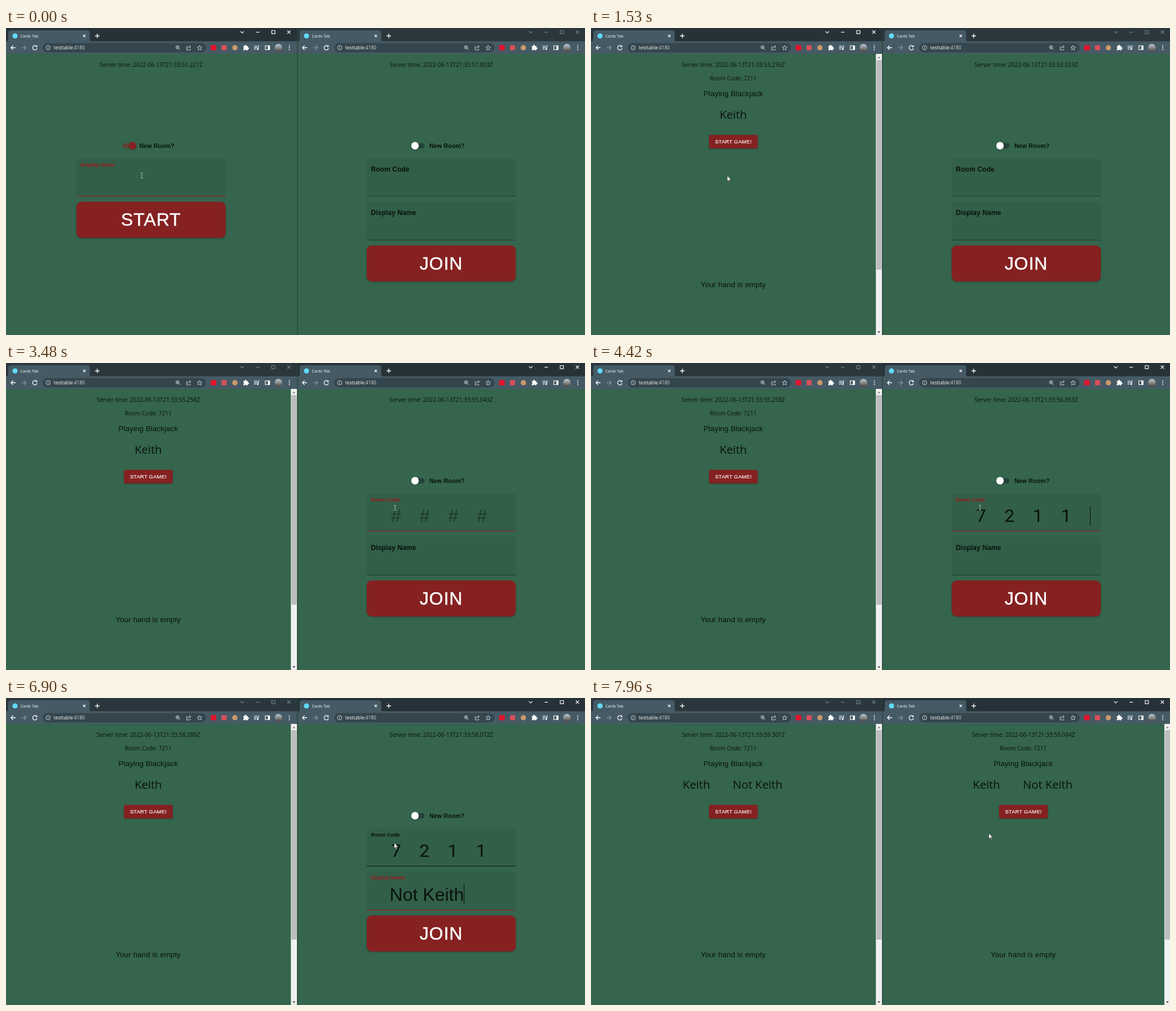
Animation of 1027x545 px, one loop 8000 ms. Source, as an HTML page:

```html
<!DOCTYPE html>
<html lang="en">
<head>
<meta charset="utf-8">
<title>Card room</title>
<style>
html, body { margin: 0; width: 100%; height: 100%; overflow: hidden; background: #35654d; }
svg { display: block; width: 1027px; height: 545px; }
text { white-space: pre; }
.ui { font-family: "Open Sans", "Noto Sans", sans-serif; }
.ar { font-family: "Liberation Sans", Arial, sans-serif; }
.num { font-family: Roboto, "Liberation Sans", sans-serif; }
.raised { filter: drop-shadow(0 1px 1px rgba(0, 0, 0, .3)); }
</style>
</head>
<body>
<svg id="stage" viewBox="0 0 1027 545"></svg>
<script>
const LOOP = 8000;
const RED = '#852121', HOT = '#a01a1e', INK = '#09120d', GREEN = '#35654d';
const NAME = 'Keith', GUEST = 'Not Keith', CODE = '7211';
const ROOM_L = 1410, FOCUS = 2670, TAB = 4450, ARROW = 6900, JOINED = 6960;

const ticksL = [[0, '51.221'], [510, '52.231'], [1530, '53.236'], [2450, '54.246'], [3480, '55.258'],
  [4480, '56.270'], [5450, '57.280'], [6480, '58.289'], [7420, '59.301']];
const ticksR = [[0, '51.003'], [360, '52.013'], [1320, '53.023'], [2240, '54.028'], [3240, '55.043'],
  [4210, '56.053'], [5210, '57.063'], [6240, '58.072'], [7210, '59.084']];
const keysName = [90, 270, 360, 480, 570];
const keysCode = [3870, 4150, 4240, 4330];
const keysGuest = [5790, 5940, 6000, 6090, 6240, 6330, 6450, 6540, 6690];
const caretOff = [[0, 90], [1100, FOCUS], [3210, 3690], [5000, 5450]];
const mouse = [[0, 241, 262], [2240, 241, 262], [2330, 330, 258], [2450, 560, 254], [2540, 690, 257],
  [ARROW, 688, 257], [JOINED, 693, 249], [7420, 693, 249], [7540, 689, 249],
  [7720, 684, 254], [7780, 680, 257], [7840, 687, 251], [7900, 697, 244], [7960, 705, 240]];

const last = (steps, t) => steps.filter(s => s[0] <= t).pop();
const typed = (word, keys, t) => word.slice(0, keys.filter(k => k <= t).length);
const ease = (t, from, ms = 200) => {
  const k = Math.min(1, Math.max(0, (t - from) / ms));
  return 1 - (1 - k) ** 3;
};
const pen = document.createElement('canvas').getContext('2d');
const widthOf = s => {
  pen.font = '32px "Liberation Sans", Arial, sans-serif';
  return pen.measureText(s).width;
};

const rect = (x, y, w, h, fill, r = 0, more = '') =>
  `<rect x="${x}" y="${y}" width="${w}" height="${h}" rx="${r}" fill="${fill}" ${more}/>`;
const disc = (x, y, r, fill, more = '') => `<circle cx="${x}" cy="${y}" r="${r}" fill="${fill}" ${more}/>`;
const ring = (x, y, r, c, w = 1) =>
  `<circle cx="${x}" cy="${y}" r="${r}" fill="none" stroke="${c}" stroke-width="${w}"/>`;
const line = (d, c, w = 1) => `<path d="${d}" fill="none" stroke="${c}" stroke-width="${w}"/>`;
const fill = (d, c) => `<path d="${d}" fill="${c}"/>`;
const text = (cls, s, x, y, size, c, more = '') =>
  `<text class="${cls}" x="${x}" y="${y}" font-size="${size}" fill="${c}" ${more}>${s}</text>`;
const MID = 'text-anchor="middle"';
const RAISED = 'class="raised"';
const bold = 'font-weight="700"';
const at = (x, y, s) => `<g transform="translate(${x} ${y})">${s}</g>`;

// Browser frame: b shifts the left-hand parts, r the right-hand parts.
function chrome(b, r, x, w, active) {
  const white = '#fafbfb', pale = '#d5dde0', grey = '#8e9ca3';
  const win = active ? white : '#74828a';
  const cross = 'M-2.8-2.8L2.8 2.8M2.8-2.8L-2.8 2.8';
  const small = 'M-2-2L2 2M2-2L-2 2';
  return rect(x, 0, w, 24, active ? '#263238' : '#2b373d') + rect(x, 23.5, w, 22.5, '#455a64')
    + at(b, 0,
      fill('M1 24Q4 24 4 20V8.500Q4 4 8.500 4H144Q148.500 4 148.500 8.500V20Q148.500 24 151.500 24Z', '#455a64')
      + disc(16, 14, 4.6, '#61dafb')
      + text('ui', 'Cards Tab', 25.5, 16.7, 7, white)
      + at(138.8, 14, line(small, white, 1.1))
      + line('M158 14H165.800M161.900 10.100V17.900', white, 1.3)
      + line('M17 35H8.800M12.600 31.200L8.800 35L12.600 38.800', white, 1.3)
      + line('M27.500 35H35.700M31.900 31.200L35.700 35L31.900 38.800', grey, 1.2)
      + line('M54 32.300A3.900 3.900 0 1 0 55 36', white, 1.3) + fill('M55.400 30.500V34.100H51.800Z', white))
    + rect(65 + b, 26.8, 290 + r - b, 16.4, '#34454d', 8.2)
    + at(b, 0, ring(74.8, 35, 3.9, pale, .9) + line('M74.800 34.500V37.200M74.800 32.600V33.500', pale)
      + text('ui', 'testtable<tspan fill="#d0d9dc">:4180</tspan>', 84.8, 37.9, 8.3, white))
    + at(r, 0,
      ring(304.3, 34.2, 2.8, pale) + line('M306.300 36.300L309 39M302.900 34.200H305.700M304.300 32.800V35.600', pale, .9)
      + line('M322 33H320.500V39H327V37M322.500 36.500Q323 33 327 33M325.300 30.800L327.800 33L325.300 35.200', pale, .9)
      + line('M343.500 30.900L344.700 33.700L347.700 34L345.400 36L346.100 39L343.500 37.400L340.900 39L341.600 36L339.300 34L342.300 33.700Z', pale, .9)
      + rect(363, 30.2, 10, 9.6, '#e0142c', 2)
      + rect(382.3, 30.6, 9, 9, '#d8505a', 1)
      + disc(406, 35, 4.7, '#c99a6b')
      + fill('M421 32H423.500A1.600 1.600 0 1 1 426.500 32H429V34.500A1.600 1.600 0 1 1 429 37.500V39.500H426.300A1.400 1.400 0 0 0 423.600 39.500H421V37A1.400 1.400 0 0 0 421 34.300Z', white)
      + line('M440 32H446M440 34.700H446M440 37.400H443.500M447.500 37.500V32H449.500', white, 1.2) + disc(446.4, 37.6, 1.5, white)
      + line('M460 31.500H467.600V38.500H460Z', white, 1.2) + rect(464.5, 31.5, 3, 7, white)
      + disc(483.2, 35, 6.7, 'url(#photo)')
      + disc(502.5, 31.5, 1, white) + disc(502.5, 35, 1, white) + disc(502.5, 38.5, 1, white))
    + at(r, 0,
      line('M415.800 5.800L419 9L422.200 5.800', win, 1.2) + line('M443.500 7.500H449.500', win, 1.2)
      + line('M471.300 4.500H477V10.200H471.300Z', win, 1.2) + at(501.8, 7.3, line(cross, win, 1.2)));
}

const stamp = (cx, ticks, t) =>
  text('ui', `Server time: 2022-06-13T21:33:${last(ticks, t)[1]}Z`, cx, 68.6, 10.1, INK, MID);

function button(x, y, w, h, r, label, size, base) {
  return rect(x, y, w, h, RED, r, RAISED)
    + text('ar', label, x + w / 2, base, size, '#fff',
      `${MID} letter-spacing="${size * .02857}" stroke="#fff" stroke-width="${size * .016}"`);
}

function toggle(x, on) {
  return rect(x + .3, 204.4, 22.7, 9.3, on ? '#5d4337' : '#24413a', 4.65)
    + disc(x + (on ? 18 : 6), 209, 6.67, on ? RED : '#fff', RAISED)
    + text('ar', 'New Room?', x + (on ? 30 : 31.5), 212.6, 10.67, INK, `${bold} letter-spacing=".1"`);
}

// k: label shrink 0..1, f: focus line 0..1
function field(x, y, h, label, k, f, hover) {
  const size = 12 - 3 * k, b = y + h;
  return fill(`M${x} ${b}V${y + 3}Q${x} ${y} ${x + 3} ${y}H${x + 261.500}Q${x + 264.500} ${y} ${x + 264.500} ${y + 3}V${b}Z`, '#325f48')
    + rect(x, b - 1, 264.5, 1, hover ? '#0d1a13' : '#1f3d2e')
    + (f > 0 ? rect(x + 132.25 * (1 - f), b - 1, 264.5 * f, 1, HOT) : '')
    + text('ar', label, x + 7.6, y + 23.4 - 9.3 * k, size, f > 0 ? HOT : INK, `${bold} letter-spacing="${size * .0094}"`);
}

const caret = (x, y, t) =>
  caretOff.some(([a, b]) => t >= a && t < b) ? '' : rect(Math.floor(x), y, 1, 36, INK);

function room(cx, t, ticks) {
  const both = t >= JOINED;
  const h6 = `${MID} letter-spacing=".1"`;
  return stamp(cx, ticks, t)
    + text('ui', 'Room Code: ' + CODE, cx, 92.6, 10.1, INK, MID)
    + text('ar', 'Playing Blackjack', cx, 121, 13.33, INK, h6)
    + (both
      ? text('ui', NAME, cx - 89.5, 160.6, 20.2, INK) + text('ui', GUEST, cx - .8, 160.6, 20.2, INK)
      : text('ui', NAME, cx, 160.6, 20.2, INK, MID))
    + button(cx - 43, 189.7, 86.3, 24, 2.7, 'START GAME!', 9.33, 204.6)
    + text('ar', 'Your hand is empty', cx, 460, 13.33, INK, h6);
}

const scrollbar = x => rect(x, 46, 11, 499, '#f1f1f1') + rect(x + 1, 57, 9.3, 372, '#bdbdbd')
  + fill(`M${x + 3} 53.500L${x + 5.500} 50.500L${x + 8} 53.500Z`, '#808080')
  + fill(`M${x + 3} 538.500L${x + 5.500} 541.500L${x + 8} 538.500Z`, '#404040');

function left(t) {
  if (t >= ROOM_L) return room(252.3, t, ticksL) + scrollbar(505.3);
  const word = typed(NAME, keysName, t);
  return stamp(257.5, ticksL, t) + toggle(206.5, true)
    + field(125, 232, 67, 'Display Name', 1, 1)
    + text('ar', word, 166.5, 282.3, 32, INK) + caret(166.5 + widthOf(word) + .3, 253, t)
    + button(125, 308.6, 264.6, 64, 9, 'START', 32, 351.4);
}

function right(t) {
  if (t >= JOINED) return room(766.8, t, ticksR) + scrollbar(1017);
  const code = typed(CODE, keysCode, t), word = typed(GUEST, keysGuest, t);
  const k1 = ease(t, FOCUS), k2 = ease(t, TAB);
  let s = stamp(772, ticksR, t) + toggle(719.5, false)
    + field(639.7, 232, 67, 'Room Code', k1, t < TAB ? k1 : 0, t >= 2500)
    + field(639.7, 308.3, 68.7, 'Display Name', k2, k2, false)
    + button(639.7, 386, 264.5, 64, 9, 'JOIN', 32, 429);
  s += code ? text('num', code, 683.1, 282.3, 32, INK, 'letter-spacing="32.2"')
    : text('ar', '####', 683.1, 282.3, 32, '#0b1a12', `letter-spacing="32.9" opacity="${.55 * k1}"`);
  if (t >= FOCUS && t < TAB) s += caret(683.1 + 50.7 * code.length, 253, t);
  s += text('ar', word, 680.6, 359.5, 32, INK);
  if (t >= TAB) s += caret(680.6 + widthOf(word) + .4, 330, t);
  return s;
}

function pointer(t) {
  const i = mouse.filter(m => m[0] <= t).length - 1;
  const a = mouse[i], b = mouse[i + 1];
  let [, x, y] = a;
  const gliding = b && (b[0] <= 2540 || a[0] >= 7420);
  if (gliding) {
    const k = (t - a[0]) / (b[0] - a[0]);
    x += (b[1] - x) * k;
    y += (b[2] - y) * k;
  }
  const beam = t < ROOM_L || (t < ARROW && x > 640);
  return at(x, y, beam
    ? line('M-2-4.500H-.500L0-4L.500-4.500H2M0-4V4M-2 4.500H-.500L0 4L.500 4.500H2', '#a9bdb2', 1)
    : '<path d="M.5 0V10.200L2.900 8L4.400 11.600L6 10.900L4.500 7.400H7.800Z" fill="#fff" stroke="#15201a" stroke-width=".7"/>');
}

const defs = '<defs><linearGradient id="photo" x2="0" y2="1"><stop stop-color="#b9cad6"/>'
  + '<stop offset=".5" stop-color="#8a8d8c"/><stop offset="1" stop-color="#4c4239"/></linearGradient>'
  + '<linearGradient id="edge"><stop stop-color="#24402f"/>'
  + '<stop offset="1" stop-color="#24402f" stop-opacity="0"/></linearGradient></defs>';

function draw(t) {
  const rightActive = t >= FOCUS;
  return defs + rect(0, 0, 1027, 545, GREEN) + left(t) + right(t)
    + chrome(0, 0, 0, 516.3, !rightActive) + chrome(517, 511.7, 516.3, 510.7, rightActive)
    + rect(516.3, 0, 2.4, 545, 'url(#edge)') + pointer(t);
}

const stage = document.getElementById('stage');
const start = performance.now();
let shown = '';
function tick() {
  const next = draw((performance.now() - start) % LOOP);
  if (next !== shown) stage.innerHTML = shown = next;
  requestAnimationFrame(tick);
}
tick();
</script>
</body>
</html>
```
